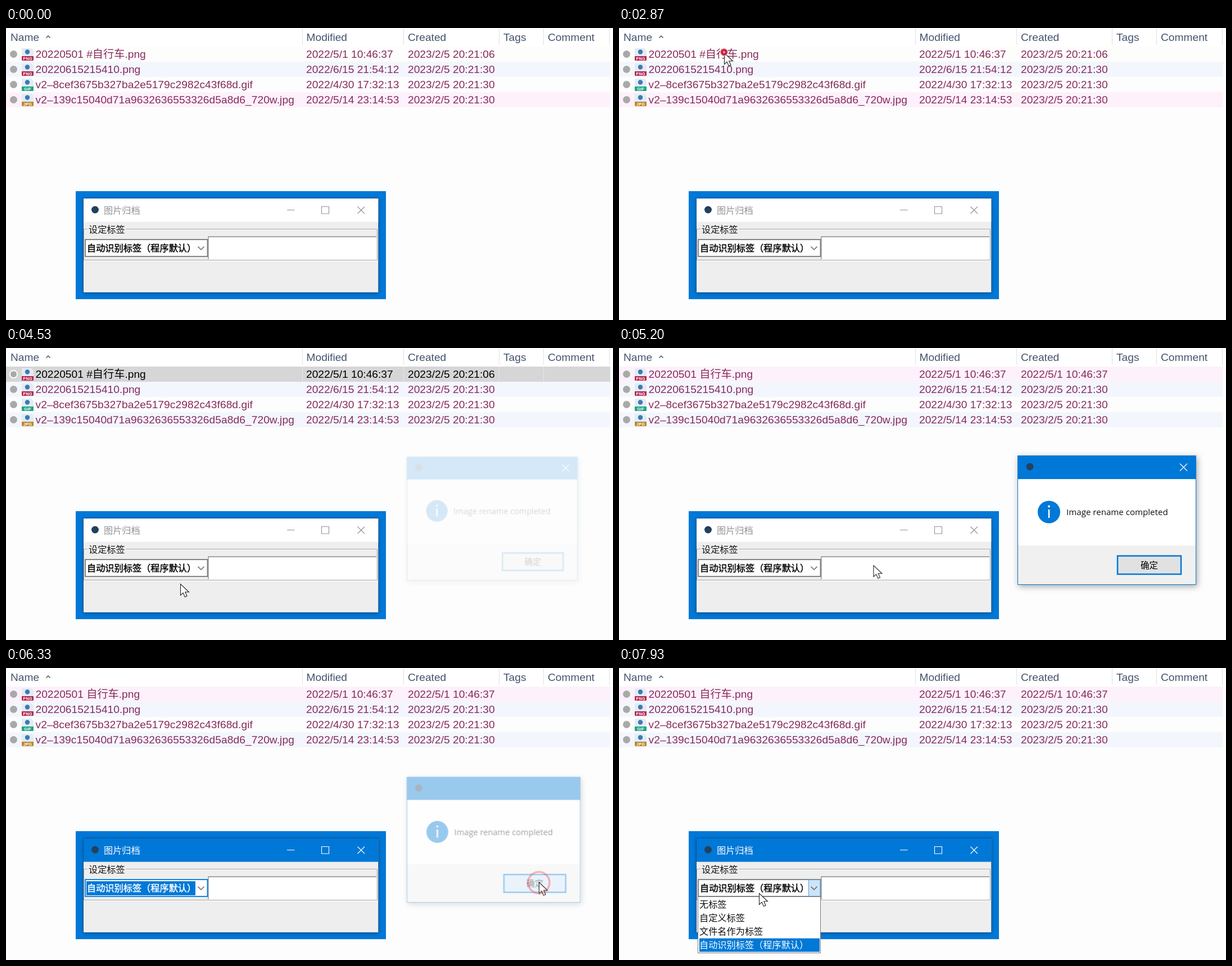
Animation of 1080x519 px, one loop 8 s. Source, as an HTML page:

```html
<!DOCTYPE html>
<html lang="zh-CN">
<head>
<meta charset="utf-8">
<title>Image filing</title>
<style>
html, body { margin: 0; width: 100%; height: 100%; overflow: hidden; background: #fdfdfd; }
svg { display: block; width: 100%; height: 100%; }
text { white-space: pre; }
.list { font: 19.2px "Liberation Sans", "Noto Sans CJK SC", "Noto Sans CJK", sans-serif; }
.head { fill: #44536f; }
.row { color: #862b5e; }
.row text { fill: currentColor; }
.hash { letter-spacing: .06px; }
.tag { font: bold 7.2px "Liberation Sans", sans-serif; letter-spacing: .3px; text-anchor: middle; fill: #fff; }
.cjk { font: 16.2px "Noto Sans CJK SC", "Noto Sans CJK", sans-serif; }
.bold { fill: currentColor; stroke: currentColor; stroke-width: .45px; }
.msg { font: 15.1px "Open Sans", "Noto Sans", sans-serif; }
.line { fill: none; stroke: currentColor; stroke-width: 1.1px; }
.shadow { filter: drop-shadow(0 1px 3px rgba(0, 0, 0, .4)); }
.deep { filter: drop-shadow(2px 3px 6px rgba(0, 0, 0, .35)); }

/* hard state changes */
.step, .step * { animation: 8s step-end infinite; }
.step .before { animation-name: before; }
.step .after { animation-name: after; }
.step .pick { animation-name: pick; }
.step .pickBg { animation-name: pickBg; }
.step .pickDot { animation-name: pickDot; }
.step .last { animation-name: last; }
.step .chrome { animation-name: chrome; }
.step .value { animation-name: value; }
.step .box { animation-name: box; }
.step .mark { animation-name: mark; }
.step .open { animation-name: open; }
@keyframes before { 0% { visibility: visible } 58.3%, 100% { visibility: hidden } }
@keyframes after { 0% { visibility: hidden } 58.3%, 100% { visibility: visible } }
@keyframes pick { 0% { color: #862b5e } 36.6%, 100% { color: #000 } }
@keyframes pickBg { 0% { fill: #fdfdfb } 36.6%, 100% { fill: #d6d6d6 } }
@keyframes pickDot { 0% { stroke: none } 36.6%, 100% { stroke: #fff } }
@keyframes last { 0% { fill: #fdf1fb } 36.6%, 100% { fill: #f3f6fd } }
@keyframes chrome {
  0%, 86.6% { fill: #fff; color: #929292 }
  78.3%, 95%, 100% { fill: #0078d7; color: #fff }
}
@keyframes value { 0%, 95%, 100% { color: #000 } 78.3% { color: #fff } }
@keyframes box { 0%, 95%, 100% { stroke: #7a7a7a } 78.3% { stroke: #0078d7 } }
@keyframes mark { 0%, 95%, 100% { visibility: hidden } 78.3% { visibility: visible } }
@keyframes open { 0% { visibility: hidden } 95%, 100% { visibility: visible } }

/* message box */
.dialog { animation: dialog 8s linear infinite; }
.ok { animation: ok 8s step-end infinite; }
.close { animation: close 8s step-end infinite; }
@keyframes dialog {
  0%, 55.8% { opacity: 0; transform: scale(.94); transform-origin: 801px 248px }
  56.625% { opacity: .15; transform: scale(.956); transform-origin: 801px 248px }
  57.5% { opacity: .7; transform: scale(.985); transform-origin: 801px 248px }
  58.4% { opacity: 1; transform: none; transform-origin: 801px 248px }
  78.3% { opacity: 1; transform: none; transform-origin: 849px 283px }
  79.125% { opacity: .4; transform: scale(.972); transform-origin: 849px 283px }
  79.9%, 100% { opacity: 0; transform: scale(.95); transform-origin: 849px 283px }
}
@keyframes ok { 0% { fill: #e1e1e1 } 71% { fill: #e5f1fb } 76.2%, 100% { fill: #cce4f7 } }
@keyframes close { 0% { opacity: 1 } 78.2%, 100% { opacity: 0 } }

/* pointer */
.pointer { animation: move 8s ease-in-out infinite, shown 8s step-end infinite; }
.hold { animation: hold 8s step-end infinite; }
.dot { animation: dot 8s step-end infinite; fill: #c4203f; stroke: #f0b4be; }
.ring { animation: ring 8s linear infinite; fill: none; stroke: #f03a3a; stroke-width: 3.5px; vector-effect: non-scaling-stroke; }
.dot, .ring { animation-delay: calc(var(--at) - 8s); }
@keyframes shown { 0% { visibility: hidden } 26.6%, 100% { visibility: visible } }
@keyframes move {
  0%, 26.6% { transform: translate(-18px, 62px) }
  33.4%, 37.5% { transform: translate(187px, 44px) }
  49%, 61.6% { transform: translate(310px, 419px); animation-timing-function: ease-in }
  65% { transform: translate(451px, 386px); animation-timing-function: ease-out }
  72.5%, 81.6% { transform: translate(948px, 380.5px) }
  86.6%, 89.1% { transform: translate(84px, 216.5px) }
  93.75%, 100% { transform: translate(249px, 400px) }
}
@keyframes hold { 0%, 48.4%, 100% { opacity: 0 } 34.6% { opacity: 1 } }
@keyframes dot { 0% { opacity: 1 } 1.65%, 100% { opacity: 0 } }
@keyframes ring {
  0%, 1.6% { opacity: 0; transform: scale(.2) }
  1.65% { opacity: .9; transform: scale(.2) }
  2.875% { opacity: .36; transform: scale(1) }
  4.1%, 100% { opacity: 0; transform: scale(1.45) }
}
</style>
</head>
<body>
<svg viewBox="0 0 1080 519" preserveAspectRatio="none">
  <defs>
    <g id="file">
      <path d="M28 36h17l4 4v10H28z" fill="#e3ebf3"/>
      <circle cx="38" cy="42.5" r="4.2" fill="#3a7ab8"/>
      <path d="M28 50h21v6.5q0 1.5-1.5 1.5h-18q-1.5 0-1.5-1.5z" fill="currentColor"/>
    </g>
  </defs>
  <rect width="1080" height="519" fill="#fdfdfd"/>
  <rect width="1080" height="33" fill="#fff"/>

  <g class="list head">
    <path d="M527.5 0V30M707.5 0V30M877.5 0V30M956.5 0V30M1073.5 0V30" stroke="#e2e2e2"/>
    <text x="8" y="22.5">Name</text>
    <path d="M71.5 17.5 75 14l3.5 3.5" fill="none" stroke="#44536f" stroke-width="1.5"/>
    <text x="534.5" y="22.5">Modified</text>
    <text x="715" y="22.5">Created</text>
    <text x="885" y="22.5">Tags</text>
    <text x="964" y="22.5">Comment</text>
  </g>

  <g class="list step">
    <g class="before">
      <g class="row pick">
        <rect class="pickBg" y="33" width="1075" height="27" fill="#fdfdfb"/>
        <path d="M527.5 33v27M707.5 33v27M877.5 33v27M956.5 33v27" stroke="#fff" stroke-opacity=".4"/>
        <circle class="pickDot" cx="13.5" cy="46.5" r="6.5" fill="#a9a9a9" stroke-width="2"/>
        <text x="52.5" y="53">20220501 #自行车.png</text>
        <text x="534" y="53">2022/5/1 10:46:37</text>
        <text x="715" y="53">2023/2/5 20:21:06</text>
      </g>
    </g>
    <g class="row after">
      <rect y="33" width="1075" height="27" fill="#fdf1fb"/>
      <circle cx="13.5" cy="46.5" r="6.5" fill="#a9a9a9"/>
      <text x="52.5" y="53">20220501 自行车.png</text>
      <text x="534" y="53">2022/5/1 10:46:37</text>
      <text x="715" y="53">2022/5/1 10:46:37</text>
    </g>
    <use href="#file" color="#b3274f"/>
    <text class="tag" x="38.6" y="56.6">PNG</text>

    <g class="row">
      <rect y="60" width="1075" height="27" fill="#f3f6fd"/>
      <circle cx="13.5" cy="73.5" r="6.5" fill="#a9a9a9"/>
      <text x="52.5" y="80">20220615215410.png</text>
      <text x="534" y="80">2022/6/15 21:54:12</text>
      <text x="715" y="80">2023/2/5 20:21:30</text>
    </g>
    <use href="#file" y="27" color="#b3274f"/>
    <text class="tag" x="38.6" y="83.6">PNG</text>

    <g class="row">
      <circle cx="13.5" cy="100.5" r="6.5" fill="#a9a9a9"/>
      <text class="hash" x="52.5" y="107">v2–8cef3675b327ba2e5179c2982c43f68d.gif</text>
      <text x="534" y="107">2022/4/30 17:32:13</text>
      <text x="715" y="107">2023/2/5 20:21:30</text>
    </g>
    <use href="#file" y="54" color="#22a385"/>
    <text class="tag" x="38.6" y="110.6">GIF</text>

    <g class="row">
      <rect class="last" y="114" width="1075" height="27" fill="#fdf1fb"/>
      <circle cx="13.5" cy="127.5" r="6.5" fill="#a9a9a9"/>
      <text class="hash" x="52.5" y="134">v2–139c15040d71a9632636553326d5a8d6_720w.jpg</text>
      <text x="534" y="134">2022/5/14 23:14:53</text>
      <text x="715" y="134">2023/2/5 20:21:30</text>
    </g>
    <use href="#file" y="81" color="#bd8a32"/>
    <text class="tag" x="38.6" y="137.6">JPG</text>
  </g>

  <!-- filing window -->
  <rect x="124" y="290" width="552" height="192" fill="#0078d7"/>
  <rect class="shadow" x="138" y="303" width="524.5" height="167" fill="#eee"/>
  <g class="step cjk">
    <g class="chrome">
      <rect x="138" y="303" width="524.5" height="41.5"/>
      <text x="174" y="329.5" fill="currentColor">图片归档</text>
      <path class="line" d="M500 323.5h13.5M561.5 317.5h13v12.5h-13zM625.5 317.5l12.5 12.5M638 317.5l-12.5 12.5"/>
    </g>
    <rect x="137.5" y="302.5" width="525" height="167.5" fill="none" stroke="#123a63" stroke-opacity=".35"/>
    <circle cx="158.5" cy="323" r="6.5" fill="#24405f"/>

    <path d="M145 357.5H138.5V412.5H660.5V357.5H213" fill="none" stroke="#a3a3a3"/>
    <path d="M145 358.5h-5.5M213 358.5h446.5M138 413.5h524" fill="none" stroke="#fff"/>
    <text x="147" y="363.5" fill="#111">设定标签</text>
    <rect x="360" y="371" width="299.5" height="41" fill="#fff"/>
    <path d="M360 411V371H659" fill="none" stroke="#8a8a8a" stroke-width="1.3"/>

    <rect class="box" x="141" y="376" width="217.5" height="30" fill="#fff" stroke="#7a7a7a" stroke-width="1.8"/>
    <rect class="mark" x="143" y="379" width="194" height="25" fill="#0078d7"/>
    <rect class="open" x="337.5" y="376.5" width="20.5" height="29" fill="#cce4f7" stroke="#5a9fd4"/>
    <text class="value bold" x="144" y="397">自动识别标签（程序默认）</text>
    <path d="M341.5 388.5 347 394l5.5-5.5" fill="none" stroke="#666" stroke-width="1.5"/>

    <g class="open">
      <rect x="140.5" y="406.5" width="218" height="100" fill="#fff" stroke="#7a7a7a"/>
      <rect x="143" y="480.5" width="214" height="24" fill="#0078d7"/>
      <g fill="#111">
        <text x="143" y="425.5">无标签</text>
        <text x="143" y="449.5">自定义标签</text>
        <text x="143" y="473.5">文件名作为标签</text>
      </g>
      <text x="143" y="498" fill="#fff">自动识别标签（程序默认）</text>
    </g>
  </g>

  <!-- message box -->
  <g class="dialog">
    <rect class="deep" x="709" y="191" width="318" height="230" fill="#fff"/>
    <rect x="709" y="351" width="318" height="70" fill="#f0f0f0"/>
    <rect x="709.5" y="191.5" width="317" height="229" fill="none" stroke="#0078d7"/>
    <rect x="709" y="191" width="318" height="42" fill="#0078d7"/>
    <circle cx="731" cy="211" r="6.5" fill="#24405f"/>
    <path class="close" d="M998 205.5l13 13M1011 205.5l-13 13" stroke="#fff" stroke-width="1.2"/>
    <circle cx="765" cy="291.5" r="20" fill="#0078d7"/>
    <path d="M765 287v15" stroke="#fff" stroke-width="2.6"/>
    <circle cx="765" cy="281.5" r="1.9" fill="#fff"/>
    <text class="msg" x="796" y="297" fill="#111">Image rename completed</text>
    <rect class="ok" x="887" y="369.5" width="113" height="32.5" fill="#e1e1e1" stroke="#0078d7" stroke-width="2.5"/>
    <text class="cjk" x="943.5" y="391.5" text-anchor="middle" style="font-size: 15.5px">确定</text>
  </g>

  <g class="pointer">
    <path d="M.5.5V20.5L5.2 16.2 8.4 23.6 12 22 8.8 14.8H15.5z" fill="#fff" stroke="#222" stroke-width="1.1"/>
    <g class="hold">
      <circle cy="-1" r="6.3" fill="#c4203f" stroke="#e9a0ae" stroke-width="1.2"/>
      <circle cy="-1" r="2" fill="#f0a5b2"/>
    </g>
    <circle class="ring" style="--at: 3.74s" r="19"/>
    <g style="--at: 6.1s"><circle class="dot" r="4.3"/><circle class="ring" cy="1" r="19"/></g>
    <g style="--at: 6.93s"><circle class="dot" cy="-1" r="4.3"/><circle class="ring" r="19"/></g>
    <g style="--at: 7.53s"><circle class="dot" r="4.3"/><circle class="ring" r="19"/></g>
  </g>
</svg>
</body>
</html>
```
